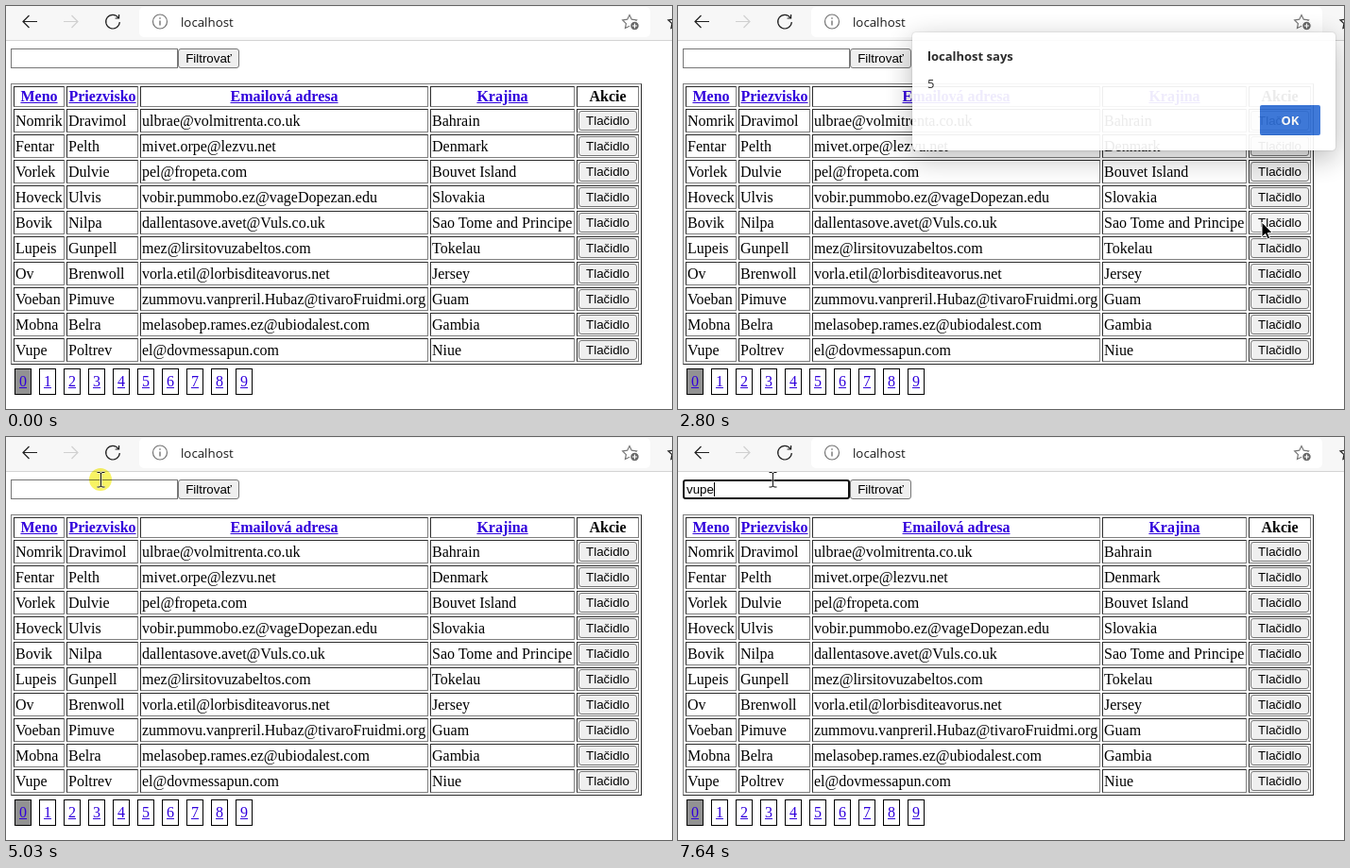
An HTML page for the animation above (8 s loop, 705 by 427 pixels).

```html
<!DOCTYPE html>
<html lang="sk">
<head>
<meta charset="utf-8">
<title>Filtrovanie tabuľky</title>
<style>
html, body { margin: 0; width: 100%; height: 100%; overflow: hidden; background: #fff; }
body { position: relative; font: 16px/18px "Liberation Serif", serif; color: #000; }
.abs, #layer > * { position: absolute; }
.ui { font-family: "Open Sans", sans-serif; white-space: nowrap; }

#bar { left: 0; top: 0; width: 705px; height: 36px; background: #f7f7f7; border-bottom: 1px solid #d4d4d4; }
#bar svg { position: absolute; left: 0; top: 0; }
#host { left: 185px; top: 8px; font-size: 13.3px; color: #1b1b1b; }

a { color: #3000dc; text-decoration: underline; }
.btn {
  display: block; box-sizing: border-box; height: 21px; text-align: center;
  font: 13.333px/19px "Liberation Sans", sans-serif;
  background: #efefef; border: 1px solid #767676; border-radius: 3px;
}
.btn.hover { background: #e5e5e5; border-color: #4f4f4f; }
.btn.active { background: #f5f5f5; border-color: #8d8d8d; }

#field {
  left: 5px; top: 45px; width: 177px; height: 21px; box-sizing: border-box;
  border: 1px solid #767676; background: #fff;
}
#field.focus { border: 2px solid #101010; border-radius: 3px; }
#typed { left: 9px; top: 48px; height: 15px; font: 13.333px/15px "Liberation Sans", sans-serif; }
#caret { display: inline-block; width: 1px; height: 15px; margin-right: -1px; background: #000; vertical-align: top; }

table {
  position: absolute; left: 5px; top: 82px; width: 668px; table-layout: fixed;
  border-collapse: separate; border-spacing: 2px; border: 1px outset gray;
}
th, td { box-sizing: border-box; height: 25px; padding: 1px; border: 1px inset gray; white-space: nowrap; vertical-align: middle; text-align: left; }
th { height: 22px; text-align: center; }

#pager a {
  position: absolute; top: 384px; width: 8px; height: 18px; padding: 4px;
  border: 1px solid #000;
}
#pager a:first-child { background: #929292; }

#dialog {
  left: 248px; top: 33px; width: 448px; height: 125px; background: #fff; border-radius: 4px;
  box-shadow: 0 8px 30px rgba(0,0,0,.3), 0 0 2px rgba(0,0,0,.25);
}
#dialog div { position: absolute; left: 16px; font-size: 13px; color: #1b1b1b; }
#dialog #ok {
  left: 368px; top: 77px; width: 64px; height: 32px; line-height: 32px; border-radius: 2px;
  background: #2f6ed5; color: #fff; font-weight: 700; text-align: center;
}
#dialog #ok.hover { background: #285aa9; }

#saved {
  left: 5px; top: 66px; width: 320px; background: #fff;
  box-shadow: 0 5px 16px rgba(0,0,0,.28), 0 0 2px rgba(0,0,0,.25);
}
#saved div { position: absolute; left: 13px; font-size: 11px; color: #222; }
#saved div:first-child { left: 15px; top: 5px; font-size: 10.4px; color: #757575; }

#click { width: 24px; height: 24px; border-radius: 50%; background: #f8f364; mix-blend-mode: multiply; }
#pointer { left: 0; top: 0; overflow: visible; }
</style>
</head>
<body>
<div id="bar" class="abs">
  <svg width="705" height="36" fill="none" stroke="#1f1f1f" stroke-width="1.2">
    <rect x="141" y="1" width="541" height="32" rx="5" fill="#fff" stroke="none"/>
    <path id="back" d="M33 16.5H18M24.5 10L18 16.5L24.5 23"/>
    <path d="M61 16.5H76M69.500 10L76 16.5L69.500 23" stroke="#d0d0d0"/>
    <path d="M119 12.500A7.300 7.300 0 1 0 120.300 17M119.600 9V13H115.600"/>
    <g stroke="#757575">
      <circle cx="163" cy="16.500" r="7.500"/>
      <path d="M163 15.500V20.500M163 12.300V13.800" stroke-width="1.400"/>
      <path id="star" d="M660 9.500L662.300 14.200L667.500 15L663.700 18.600L664.500 23.500L660 21.300L655.500 23.500L656.400 18.600L652.700 15L657.700 14.200Z"/>
      <circle cx="665.500" cy="21" r="4.800" fill="#666" stroke="#fff"/>
      <path d="M663 21H668M665.500 18.500V23.500" stroke="#fff"/>
    </g>
    <path d="M709 9.500L706.700 14.200L701 15L705 18.600L704 23.500L709 21.300"/>
  </svg>
  <div id="host" class="abs ui">localhost</div>
</div>

<div id="field" class="abs"></div>
<div id="typed" class="abs"><span id="text"></span><span id="caret"></span></div>
<span class="btn abs" style="left:182px;top:45px;width:65px">Filtrovať</span>
<table><tbody id="rows"></tbody></table>
<div id="pager"></div>

<div id="layer">
  <div id="saved" class="ui"></div>
  <div id="dialog" class="ui">
    <div style="top:16px;font-weight:700">localhost says</div>
    <div style="top:45px">5</div>
    <div id="ok">OK</div>
  </div>
</div>
<div id="click" class="abs"></div>
<svg id="pointer" class="abs" width="1" height="1">
  <path id="arrow" d="M0 0V16L3.700 12.500L6.200 18L8.700 17L6.300 11.500H11.300Z" fill="#000" stroke="#fff" stroke-width="1"/>
  <g id="beam" fill="none">
    <path d="M-3.500 -7.500H-1L.5 -6.500L2 -7.500H4.500M.5 -7V7.500M-3.500 8H-1L.5 7L2 8H4.500" stroke="#fff" stroke-width="2.400" opacity=".7"/>
    <path d="M-3.500 -7.500H-1L.5 -6.500L2 -7.500H4.500M.5 -7V7.500M-3.500 8H-1L.5 7L2 8H4.500" stroke="#111"/>
  </g>
</svg>

<script>
const $ = id => document.getElementById(id);
const LOOP = 8000, TICK = 96.67, WORD = 'vupe';

const people = [
  'Nomrik|Dravimol|ulbrae@volmitrenta.co.uk|Bahrain',
  'Fentar|Pelth|mivet.orpe@lezvu.net|Denmark',
  'Vorlek|Dulvie|pel@fropeta.com|Bouvet Island',
  'Hoveck|Ulvis|vobir.pummobo.ez@vageDopezan.edu|Slovakia',
  'Bovik|Nilpa|dallentasove.avet@Vuls.co.uk|Sao Tome and Principe',
  'Lupeis|Gunpell|mez@lirsitovuzabeltos.com|Tokelau',
  'Ov|Brenwoll|vorla.etil@lorbisditeavorus.net|Jersey',
  'Voeban|Pimuve|zummovu.vanpreril.Hubaz@tivaroFruidmi.org|Guam',
  'Mobna|Belra|melasobep.rames.ez@ubiodalest.com|Gambia',
  'Vupe|Poltrev|el@dovmessapun.com|Niue'
];
const columns = [['Meno', 54], ['Priezvisko', 76], ['Emailová adresa', 305], ['Krajina', 153], ['Akcie', 66]];

$('rows').innerHTML =
  '<tr>' + columns.map(([name, w], i) =>
    `<th style="width:${w}px">${i < 4 ? `<a>${name}</a>` : name}</th>`).join('') + '</tr>' +
  people.map(p => '<tr>' + p.split('|').map(c => `<td>${c}</td>`).join('') +
    '<td><span class="btn">Tlačidlo</span></td></tr>').join('');
$('pager').innerHTML = Array.from({ length: 10 }, (_, i) =>
  `<a style="left:${9 + 26 * i}px">${i}</a>`).join('');
const rowButton = document.querySelectorAll('td .btn')[4];

// Pointer waypoints: tick, x, y
const path = [
  [0, 580, 364], [3, 400, 310], [6, 117, 195], [7, 130, 183], [8, 182, 221],
  [9, 215, 226], [11, 430, 233], [13, 638, 237], [14, 638, 237], [17, 609, 229],
  [20, 609, 229], [22, 618, 229], [31, 618, 229], [36, 640, 150], [38, 650, 110],
  [40, 653, 116], [43, 653, 116], [46, 390, 70], [49, 104, 47], [50, 100, 45]
];
const between = (k, a, b) => k >= a && k < b;

function pointerAt(k) {
  const i = path.findIndex(p => p[0] >= k);
  if (i < 0) return path[path.length - 1].slice(1);
  if (i === 0) return path[0].slice(1);
  const [k0, x0, y0] = path[i - 1], [k1, x1, y1] = path[i];
  const u = (k - k0) / (k1 - k0);
  return [x0 + (x1 - x0) * u, y0 + (y1 - y0) * u].map(Math.round);
}

function dialogAlpha(k) {
  if (k < 27 || k > 43) return 0;
  return k === 27 ? 0.5 : k === 28 ? 0.92 : k === 43 ? 0.5 : 1;
}

let shownItems = '';
function showSaved(items) {
  if (items.join() === shownItems) return;
  shownItems = items.join();
  const box = $('saved');
  box.style.display = items.length ? '' : 'none';
  box.style.height = 31 + 34 * items.length + 'px';
  box.innerHTML = '<div>Saved data</div>' +
    items.map((s, i) => `<div style="top:${36 + 34 * i}px">${s}</div>`).join('');
}
$('saved').style.display = 'none';

function render(t) {
  const k = Math.floor((t - 92) / TICK);
  const show = (id, on) => { $(id).style.visibility = on ? 'visible' : 'hidden'; };

  const [x, y] = pointerAt(k);
  const beam = between(k, 8, 11) || k >= 49;
  show('pointer', k >= 0);
  $('pointer').style.transform = `translate(${x}px,${y}px)`;
  $('arrow').style.display = beam ? 'none' : '';
  $('beam').style.display = beam ? '' : 'none';

  show('click', between(k, 25, 27) || between(k, 41, 43) || between(k, 50, 52));
  $('click').style.transform = `translate(${x - 12}px,${y - 12}px)`;

  rowButton.className = 'btn' +
    (between(k, 25, 32) ? ' active' : between(k, 13, 43) ? ' hover' : '');

  const alpha = dialogAlpha(k);
  $('dialog').style.opacity = alpha;
  $('dialog').style.transform = `translateY(${k === 27 ? -10 : k === 28 ? -5 : 0}px)`;
  $('ok').className = between(k, 38, 44) ? 'hover' : '';

  $('field').className = 'abs' + (k >= 52 ? ' focus' : '');
  show('caret', between(k, 52, 59) || k >= 67);
  const typed = [73, 75, 76, 78].filter(n => k >= n).length;
  $('text').textContent = WORD.slice(0, typed);

  showSaved(between(k, 53, 73) ? ['v*pe', 'v*e', 'an*', 'b*n', '*o'] :
    between(k, 73, 75) ? ['v*pe', 'v*e'] : []);
}

const start = performance.now();
function frame() {
  render((performance.now() - start) % LOOP);
  requestAnimationFrame(frame);
}
frame();
</script>
</body>
</html>
```
